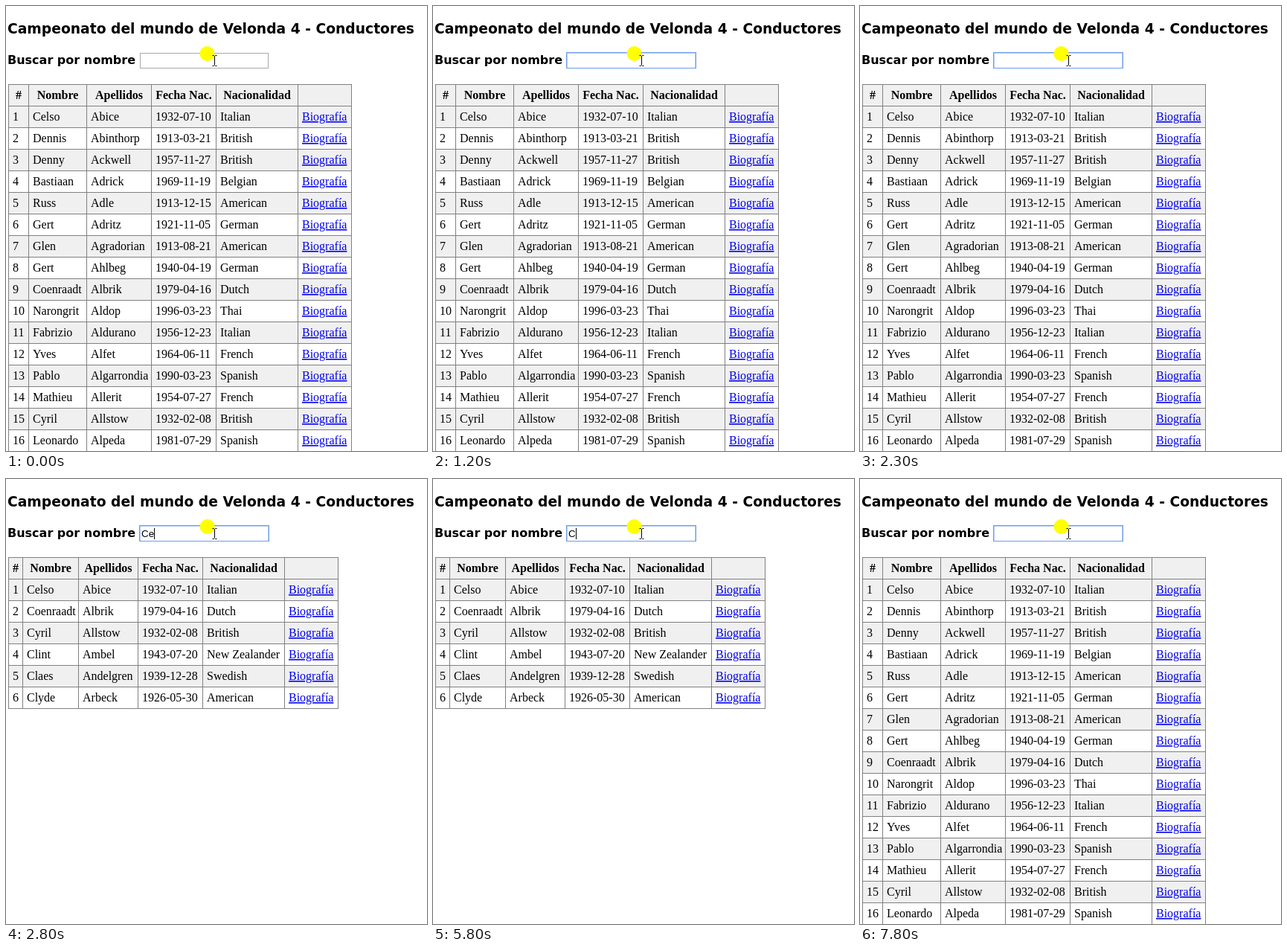
Recreate the animation shown at these times as an HTML page. Size 566x598 px, loop 8000 ms.

```html
<!DOCTYPE html>
<html lang="es">
<head>
<meta charset="utf-8">
<title>Conductores</title>
<style>
  html, body { margin: 0; width: 100%; height: 100%; overflow: hidden; background: #fff; }
  svg { display: block; width: 566px; height: 598px; }
  .head { font: bold 18.72px "DejaVu Sans", sans-serif; }
  .label { font: bold 16px "DejaVu Sans", sans-serif; }
  .typed { font: 13.333px "Liberation Sans", Arial, sans-serif; }
  .cell { font: 16px "Liberation Serif", "Times New Roman", serif; }
  .th { font-weight: bold; text-anchor: middle; }
  .link { fill: #00e; text-decoration: underline; }
  .grid { stroke: #808080; fill: none; shape-rendering: crispEdges; }
  .box { fill: none; shape-rendering: crispEdges; }
</style>
</head>
<body>
<svg id="stage" viewBox="0 0 566 598">
  <text class="head" x="2" y="37">Campeonato del mundo de Velonda 4 - Conductores</text>
  <text class="label" x="2" y="78">Buscar por nombre</text>
  <rect id="plain" class="box" x="180.5" y="63.5" width="172" height="20" stroke="#a9a9a9"/>
  <g id="ring">
    <rect class="box" x="180.5" y="63.5" width="172" height="20" stroke="#b5cdf8"/>
    <rect class="box" x="179.5" y="62.5" width="174" height="21" stroke="#6f9bea"/>
  </g>
  <text id="typed" class="typed" x="182" y="78"></text>
  <rect id="caret" y="66" width="1" height="15" shape-rendering="crispEdges"/>
  <circle cx="270.5" cy="64" r="10" fill="#ff0"/>
  <path d="M277.5 66.5h2l1 1 1-1h2M280.5 67v12M277.5 80.5h2l1-1 1 1h2" fill="none" stroke="#000"/>
</svg>
<script>
const LOOP = 8000, BLINK = 500, LAG = 100;
const TOP = 105, ROW = 29;
const HEADS = ['#', 'Nombre', 'Apellidos', 'Fecha Nac.', 'Nacionalidad', ''];

const drivers = `Celso,Abice,1932-07-10,Italian
Dennis,Abinthorp,1913-03-21,British
Denny,Ackwell,1957-11-27,British
Bastiaan,Adrick,1969-11-19,Belgian
Russ,Adle,1913-12-15,American
Gert,Adritz,1921-11-05,German
Glen,Agradorian,1913-08-21,American
Gert,Ahlbeg,1940-04-19,German
Coenraadt,Albrik,1979-04-16,Dutch
Narongrit,Aldop,1996-03-23,Thai
Fabrizio,Aldurano,1956-12-23,Italian
Yves,Alfet,1964-06-11,French
Pablo,Algarrondia,1990-03-23,Spanish
Mathieu,Allerit,1954-07-27,French
Cyril,Allstow,1932-02-08,British
Leonardo,Alpeda,1981-07-29,Spanish
Clint,Ambel,1943-07-20,New Zealander
Claes,Andelgren,1939-12-28,Swedish
Clyde,Arbeck,1926-05-30,American`.split('\n').map(line => line.split(','));

// Column edges for an empty, one-letter and longer search
const EDGES = [
  [3, 30, 108, 195, 282, 392, 464],
  [3, 22, 97, 177, 264, 374, 446],
  [3, 22, 89, 165, 252, 354, 426]
];

// Moments at which the search text changes or the caret restarts
const KEYS = [
  [200, ''], [310, ''],
  [2600, 'C'], [2800, 'Ce'], [2900, 'Cel'], [3000, 'Cels'], [3100, 'Celso'],
  [5000, 'Cels'], [5100, 'Cel'], [5300, 'Ce'], [5500, 'C'], [6200, '']
];

const $ = id => document.getElementById(id);
const stage = $('stage');

function add(parent, tag, attrs, text) {
  const el = document.createElementNS(stage.namespaceURI, tag);
  for (const key in attrs) el.setAttribute(key, attrs[key]);
  if (text) el.textContent = text;
  parent.appendChild(el);
  return el;
}

function buildTable(edges, prefix) {
  const rows = drivers.filter(d => d[0].startsWith(prefix));
  const group = add(stage, 'g', {});
  const left = edges[0], right = edges[6];
  const bottom = TOP + ROW * (rows.length + 1);

  for (let r = 0; r <= rows.length; r++) {
    if (r > 1 && r % 2 === 0) continue;
    add(group, 'rect', { x: left, y: TOP + r * ROW, width: right - left, height: ROW, fill: '#f0f0f0' });
  }

  let path = '';
  for (let y = TOP; y <= bottom; y += ROW) path += `M${left} ${y + .5}H${right + 1}`;
  for (const x of edges) path += `M${x + .5} ${TOP}V${bottom + 1}`;
  add(group, 'path', { class: 'grid', d: path });

  HEADS.forEach((head, c) => {
    const x = (edges[c] + edges[c + 1] + 1) / 2;
    add(group, 'text', { class: 'cell th', x, y: TOP + 20 }, head);
  });
  rows.forEach((driver, r) => {
    [r + 1, ...driver, 'Biografía'].forEach((value, c) => {
      const cls = c === 5 ? 'cell link' : 'cell';
      add(group, 'text', { class: cls, x: edges[c] + 6, y: TOP + ROW * (r + 1) + 20 }, String(value));
    });
  });
  return group;
}

const tables = EDGES.map((edges, i) => buildTable(edges, 'Ce'.slice(0, i)));
const show = (el, on) => { el.style.display = on ? '' : 'none'; };
const keyAt = t => KEYS.filter(k => k[0] <= t).pop();
const textAt = t => (keyAt(t) || [0, ''])[1];

const measure = document.createElement('canvas').getContext('2d');
measure.font = '13.333px "Liberation Sans", Arial, sans-serif';

function draw(t) {
  const key = keyAt(t);
  const text = textAt(t);
  const view = Math.min(textAt(t - LAG).length, 2);
  tables.forEach((table, i) => show(table, i === view));

  show($('plain'), !key);
  show($('ring'), key);
  $('typed').textContent = text;
  $('caret').setAttribute('x', 182 + Math.round(measure.measureText(text).width));
  show($('caret'), key && Math.floor((t - key[0]) / BLINK) % 2 === 0);
}

const start = performance.now();
function tick() {
  draw((performance.now() - start) % LOOP);
  requestAnimationFrame(tick);
}
tick();
</script>
</body>
</html>
```
